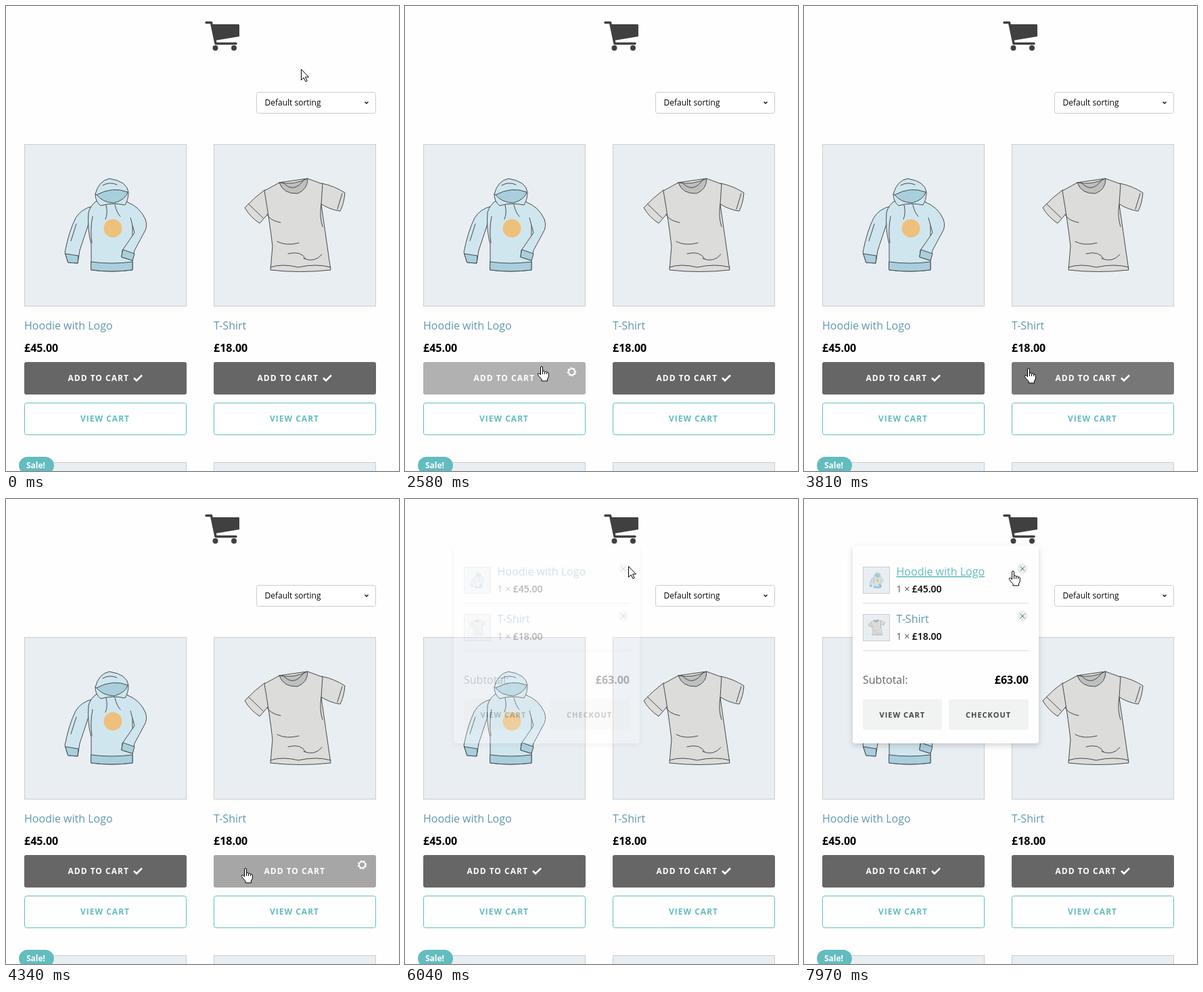
Write an HTML page that moves like this. It is 581 px wide and 687 px high and loops after 8 s.

```html
<!DOCTYPE html>
<html lang="en">
<head>
<meta charset="utf-8">
<title>Shop with cart popup</title>
<style>
  html, body { margin: 0; width: 100%; height: 100%; overflow: hidden; background: #fefefe; }
  svg { display: block; width: 581px; height: 687px; }
  text { font: 16px "Open Sans", sans-serif; }
  .title { fill: #6198ae; }
  .title.hover { fill: #62bcc0; }
  .price { font-weight: 700; fill: #000; }
  .label { font-size: 12px; font-weight: 700; letter-spacing: 1px; fill: #fff; }
  .teal { fill: #62bcc0; }
  .small { font-size: 11px; fill: #444; }
  .item { font-size: 14px; fill: #555; }
  .item tspan { font-weight: 600; fill: #000; }
  .photo { fill: #e9eef3; stroke: #ccc; }
  .line { fill: none; stroke: #454a4d; stroke-linecap: round; stroke-linejoin: round; }
  .check { fill: none; stroke: #fff; stroke-width: 2.5; }
  .panel { fill: #fefefe; filter: drop-shadow(0 3px 4px rgba(0, 0, 0, .17)); }
  .grey { fill: #f1f2f2; }
  .rule { stroke: #ebebeb; stroke-width: 2; }
  #cartLink.hover { text-decoration: underline; }
</style>
</head>
<body>
<svg viewBox="0 0 581 687">
  <defs>
    <g id="hoodie">
      <g class="line">
        <g fill="#d0e6ee">
          <path d="M127 296Q111 300 103 313Q93 333 87 364L92 379L106 380L109 361L121 325Z"/>
          <path d="M134 288Q125 294 122 305Q120 330 126 352V390Q156 394 187 390V312Q188 295 179 289Z"/>
          <path d="M180 290Q198 297 206 315Q210 326 204 335L190 361L187 376L171 371L172 361L190 335L184 313"/>
          <path d="M132 278Q137 258 153 255Q179 259 181 275Q181 286 176 294Q157 290 140 295Q132 289 132 278Z"/>
        </g>
        <g fill="#a9cfdc">
          <path d="M134 279Q158 266 180 275Q177 286 160 291Q142 290 134 279Z"/>
          <path d="M126 378Q156 382 187 378V390Q156 394 126 390ZM88 366L107 369L106 380L92 379ZM173 360L190 366L187 376L171 371Z"/>
        </g>
        <path d="M148 294Q151 306 147 315M161 294Q164 306 169 311M128 311Q124 331 127 350M104 322L96 347M143 265Q153 259 164 264"/>
      </g>
      <circle cx="158" cy="328.500" r="13.500" fill="#edc17c"/>
    </g>
    <g id="shirt" class="line">
      <g fill="#dcdcda">
        <path d="M382 272Q367 283 353 298Q361 312 375 321L389 305L391 278Z"/>
        <path d="M467 262Q486 266 501 276Q500 291 494 303Q479 301 465 292Z"/>
        <path d="M404 261L382 273Q390 320 394 355L391 390Q435 395 480 390L466 293L468 263L446 255Z"/>
      </g>
      <path fill="#bfc0be" d="M404 261Q425 265 446 255Q446 271 431 277Q410 278 404 261Z"/>
      <path d="M409 260Q425 279 441 256M391 386Q408 380 432 386Q459 380 480 386M386 308Q390 317 406 320M401 348Q414 355 433 350M417 366Q437 361 443 374M440 373Q456 380 467 367M466 293Q463 312 468 326M358 292L380 313M497 277L490 300"/>
    </g>
    <g id="remove"><circle r="8" fill="#eaf0ee"/><path d="M-3.500-3.500l7 7m0-7l-7 7" stroke="#55785f"/></g>
  </defs>

  <g fill="#404040">
    <path fill="none" stroke="#404040" stroke-width="3.500" stroke-linecap="round" stroke-linejoin="round" d="M296 24.500H303.500L310 55.500H340"/>
    <path d="M304 27H344L345 28V45L309 51Z"/>
    <circle cx="309.500" cy="62" r="4"/><circle cx="337" cy="62" r="4"/>
  </g>

  <rect x="370.500" y="127.500" width="176" height="31" rx="3" fill="#fff" stroke="#ccc"/>
  <text x="382.500" y="147" style="font-size:12px">Default sorting</text>
  <path d="M530.500 141.500l2.500 2.500 2.500-2.500" fill="none" stroke="#111" stroke-width="1.400"/>

  <g id="products"></g>

  <rect x="19" y="666" width="52" height="26" rx="13" class="teal"/>
  <text class="label" x="30" y="683" style="letter-spacing:0">Sale!</text>

  <g id="emptyCart">
    <rect class="panel" x="72" y="69" width="275" height="86" rx="4"/>
    <text x="209.500" y="118" fill="#666" text-anchor="middle">No products in the cart.</text>
  </g>
  <g id="fullCart">
    <rect class="panel" x="72" y="69" width="275" height="292" rx="4"/>
    <g id="items"></g>
    <text x="87" y="273" fill="#666">Subtotal:</text>
    <text class="price" x="332" y="273" text-anchor="end">£63.00</text>
    <rect class="grey" x="87" y="296" width="117" height="45" rx="3"/>
    <rect class="grey" x="214" y="296" width="118" height="45" rx="3"/>
    <text class="label small" x="111.500" y="323">VIEW CART</text>
    <text class="label small" x="239" y="323">CHECKOUT</text>
  </g>

  <g id="arrow" fill="#fff" stroke="#000">
    <path d="M.5.5V16.500L4.200 13 7 18.700 9.200 17.700 6.600 12H11.500Z"/>
  </g>
  <g id="hand" fill="#fff" stroke="#000" stroke-linejoin="round">
    <path d="M-.5 13V2a1.500 1.500 0 0 1 3 0V7.500Q5 6.300 5.500 8.300Q8 7.200 8.500 9.300Q11.300 8.500 11.300 11V15Q11.300 17 9.500 19V22H1V19.500Q-3 15.500-4.700 12.500Q-4.800 10.500-3 10.600Q-1.700 11-.5 13Z"/>
    <path fill="none" d="M2.500 7.500V12M5.500 8.500V12M8.500 9.500V12"/>
  </g>
</svg>

<script>
const LOOP = 8000, FADE = 150;
const $ = id => document.getElementById(id);
const clamp = v => Math.min(1, Math.max(0, v));
const easeOut = u => u * (2 - u);
const fade = (t, from, to) => clamp((t - from) / FADE) - clamp((t - to) / FADE);
const within = (p, x, y, w, h) => p.x >= x && p.x <= x + w && p.y >= y && p.y <= y + h;

const products = [
  { art: 'hoodie', name: 'Hoodie with Logo', price: '£45.00', hover: [1890, 3560], busy: [2470, 3085] },
  { art: 'shirt', name: 'T-Shirt', price: '£18.00', hover: [3750, 4970], busy: [4265, 4770] }
];
products.forEach((item, i) => item.x = 27 + 280 * i);

// Mouse moves: start, end, target x, target y.
const home = { x: 436, y: 93 };
const moves = [
  [120, 320, 321, 50], [800, 860, 400, 44], [950, 1320, 297, 295],
  [1500, 2110, 201, 532], [3520, 3950, 346, 535], [4120, 4180, 353, 534], [4280, 4340, 353, 545],
  [4780, 5100, 356, 452], [5100, 5260, 344, 290], [5440, 5720, 331, 111],
  [5980, 6410, 328, 65], [6430, 6650, 328, 57], [7000, 7590, 277, 109], [7780, 7970, 308, 106]
];

function pointerAt(t) {
  let { x, y } = home;
  for (const [start, end, toX, toY] of moves) {
    const u = easeOut(clamp((t - start) / (end - start)));
    x += (toX - x) * u;
    y += (toY - y) * u;
  }
  return { x, y };
}

$('products').innerHTML = products.map(({ x, art, name, price }) => `
  <rect class="photo" x="${x + .5}" y="204.500" width="239" height="239"/>
  <use href="#${art}"/>
  <text class="title" id="${art}Title" x="${x}" y="478">${name}</text>
  <text class="price" x="${x}" y="511">${price}</text>
  <rect id="${art}Button" x="${x}" y="526" width="240" height="48" rx="3"/>
  <text id="${art}Label" class="label" y="554">ADD TO CART</text>
  <path id="${art}Check" class="check" d="M${x + 162} 549.500l4 4 8-8"/>
  <g id="${art}Spinner" fill="none" stroke="#fff">
    <circle r="4.600" stroke-width="2"/><circle r="6" stroke-width="1.500" stroke-dasharray="2.350"/>
  </g>
  <rect x="${x + .5}" y="586.500" width="239" height="47" rx="3" fill="#fff" stroke="#62bcc0"/>
  <text class="label teal" x="${x + 83}" y="614">VIEW CART</text>
  <rect class="photo" x="${x + .5}" y="674.500" width="239" height="239"/>`).join('');

$('items').innerHTML = products.map(({ x, art, name, price }, i) => `
  <g transform="translate(0 ${70 * i})">
    <rect class="photo" x="87.500" y="100.500" width="39" height="39"/>
    <use href="#${art}" transform="translate(87 100) scale(${1 / 6}) translate(${-x} -204)"/>
    <text class="title" ${i ? '' : 'id="cartLink"'} x="136.500" y="113">${name}</text>
    <text class="item" x="136.500" y="138">1 × <tspan>${price}</tspan></text>
    <use href="#remove" x="323" y="103"/>
    <path class="rule" d="M87 154H332"/>
  </g>`).join('');

function draw(t) {
  const p = pointerAt(t);
  const empty = fade(t, 150, 1000), full = fade(t, 6000, LOOP + FADE);
  $('emptyCart').style.opacity = empty;
  $('fullCart').style.opacity = full;

  const onLink = full > .5 && within(p, 136, 96, 176, 23);
  $('cartLink').classList.toggle('hover', onLink);
  let clickable = onLink;

  for (const { x, art, hover, busy } of products) {
    const grey = 102 + 41 * fade(t, ...hover) + 46 * fade(t, ...busy);
    const loading = t >= busy[0] && t < busy[1];
    const onProduct = empty + full < .5 && within(p, x, 204, 240, 311);
    clickable ||= onProduct || within(p, x, 526, 240, 48);
    $(art + 'Title').classList.toggle('hover', onProduct);
    $(art + 'Button').setAttribute('fill', `rgb(${grey},${grey},${grey})`);
    $(art + 'Label').setAttribute('x', x + (loading ? 74.500 : 64.500));
    $(art + 'Check').style.opacity = loading ? 0 : 1;
    $(art + 'Spinner').style.opacity = loading ? 1 : 0;
    $(art + 'Spinner').setAttribute('transform', `translate(${x + 219.500} 540.500) rotate(${(t - busy[0]) * .18})`);
  }

  for (const id of ['arrow', 'hand']) {
    $(id).setAttribute('transform', `translate(${Math.round(p.x)} ${Math.round(p.y)})`);
    $(id).style.opacity = (id === 'hand') === clickable ? 1 : 0;
  }
}

function tick() {
  draw(performance.now() % LOOP);
  requestAnimationFrame(tick);
}
tick();
</script>
</body>
</html>
```
